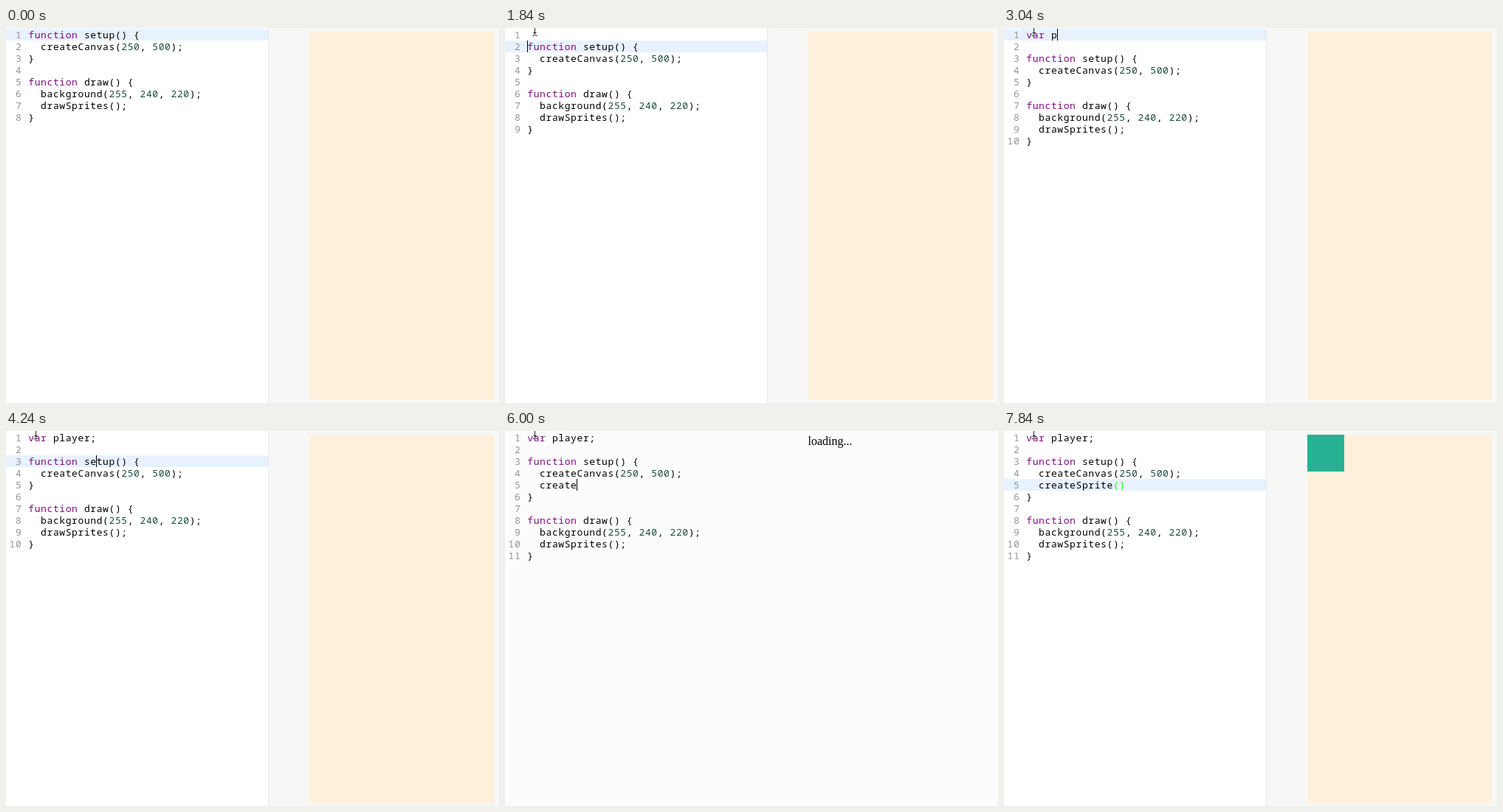
An HTML page with a canvas that plays this animation: 668x509 px, repeating every 8 s.

```html
<!DOCTYPE html>
<html lang="en">
<head>
<meta charset="utf-8">
<title>Code editor with live preview</title>
<style>
  html, body { margin: 0; width: 100%; height: 100%; overflow: hidden; background: #fff; }
  canvas { display: block; }
</style>
</head>
<body>
<canvas id="stage" width="668" height="509"></canvas>
<script>
const ctx = document.getElementById('stage').getContext('2d');
const LOOP = 8000, TICK = 80;
const CHAR = 8.4, ROW = 16, LEFT = 30;
const CODE_FONT = '500 13px "Noto Sans Mono", "DejaVu Sans Mono", monospace';
const RELOAD = [6000, 6080];
const CLICK = 1440, SPRITE = 7600, CARET_OFF = 7840;

const START = [
  'function setup() {',
  '  createCanvas(250, 500);',
  '}',
  '',
  'function draw() {',
  '  background(255, 240, 220);',
  '  drawSprites();',
  '}'
];

const KEYS = [
  [1840, 'Enter'], [1920, 'Enter'], [2240, 'Up'], [2320, 'Up'],
  [2480, 'v'], [2640, 'a'], [2720, 'r'], [2880, ' '], [3040, 'p'], [3200, 'l'],
  [3360, 'a'], [3440, 'y'], [3600, 'e'], [3680, 'r'], [3840, ';'],
  [4080, 'Down'], [4240, 'Down'], [4400, 'Down'],
  [4720, 'End'], [4880, 'Enter'],
  [5120, 'c'], [5280, 'r'], [5360, 'e'], [5520, 'a'], [5600, 't'], [5760, 'e'],
  [6160, 'S'], [6320, 'p'], [6400, 'r'], [6560, 'i'], [6720, 't'], [6800, 'e'],
  [7120, '('], [7280, ')']
];

function press(ed, key) {
  const line = ed.lines[ed.row];
  const before = line.slice(0, ed.col), after = line.slice(ed.col);
  if (key === 'Up' || key === 'Down') {
    ed.row += key === 'Up' ? -1 : 1;
    ed.col = Math.min(ed.goal, ed.lines[ed.row].length);
    return;
  }
  if (key === 'Enter') {
    const indent = before.match(/^ */)[0];
    ed.lines.splice(ed.row++, 1, before, indent + after);
    ed.col = indent.length;
  } else if (key === 'End') {
    ed.col = line.length;
  } else {
    // Brackets close themselves; a typed ")" steps over the added one.
    const stepOver = key === ')' && after[0] === ')';
    if (!stepOver) ed.lines[ed.row] = before + key + (key === '(' ? ')' : '') + after;
    ed.col++;
  }
  ed.goal = ed.col;
}

function editorAt(t) {
  const ed = { lines: START.slice(), row: 0, col: 0, goal: 0 };
  for (const [time, key] of KEYS) if (time <= t) press(ed, key);
  return ed;
}

function rect(color, x, y, w, h) {
  ctx.fillStyle = color;
  ctx.fillRect(x, y, w, h);
}

// Each glyph sits in the middle of its grid cell.
function drawCells(text, x, y, color) {
  ctx.fillStyle = color;
  ctx.textAlign = 'center';
  [...text].forEach((ch, i) => ctx.fillText(ch, x + (i + 0.5) * CHAR, y));
}

function tokenColor(token, matched) {
  if (/^(function|var)$/.test(token)) return '#800c80';
  if (/^\d/.test(token)) return '#1c4c3f';
  return matched && /[()]/.test(token) ? '#00ff00' : '#000';
}

function drawLine(text, row, matched) {
  const y = 14 + row * ROW;
  const number = String(row + 1);
  drawCells(number, 21 - number.length * CHAR, y, '#949494');
  for (const m of text.matchAll(/\w+|[^\w\s]/g)) {
    drawCells(m[0], LEFT + m.index * CHAR, y, tokenColor(m[0], matched));
  }
}

function drawEditor(t, loading) {
  const ed = editorAt(t);
  if (!loading) rect('#e8f2ff', 0, 1 + ed.row * ROW, 355, ROW);
  ctx.font = CODE_FONT;
  ed.lines.forEach((text, i) => drawLine(text, i, t >= 7120 && i === ed.row));
  if (t >= CLICK && t < CARET_OFF) {
    rect('#000', Math.floor(LEFT + ed.col * CHAR), 1 + ed.row * ROW, 1, ROW);
  }
}

function drawPreview(t, loading) {
  if (loading) {
    ctx.font = '16px "Liberation Serif", Times, serif';
    ctx.textAlign = 'left';
    ctx.fillStyle = '#000';
    ctx.fillText('loading...', 410.5, 19);
    return;
  }
  rect('#f7f7f7', 355, 0, 313, 509);
  rect('#e6e6e6', 355, 0, 1, 509);
  rect('rgb(255,240,220)', 411, 5, 250, 500);
  if (t >= SPRITE) rect('#27b294', 411, 5, 50, 50);
}

function pointerAt(t) {
  if (t >= CLICK) return [40, 3];
  const p = Math.min(1, (t - 80) / 1040);
  const e = p * p * (3 - 2 * p);
  return [Math.round(170 - 126 * e), Math.round(387 - 378 * e)];
}

function drawPointer(t) {
  if (t < 80) return;
  const [x, y] = pointerAt(t);
  ctx.save();
  ctx.translate(x + 0.5, y + 0.5);
  ctx.beginPath();
  for (const s of [-1, 1]) {
    ctx.moveTo(-3, 7 * s);
    ctx.lineTo(-1, 7 * s);
    ctx.lineTo(0, 6 * s);
    ctx.lineTo(1, 7 * s);
    ctx.lineTo(3, 7 * s);
  }
  ctx.moveTo(0, -6);
  ctx.lineTo(0, 6);
  ctx.moveTo(-2, 3);
  ctx.lineTo(2, 3);
  ctx.strokeStyle = '#222';
  ctx.lineWidth = 1;
  ctx.stroke();
  ctx.restore();
}

function draw(now) {
  const t = Math.floor((now % LOOP) / TICK) * TICK;
  const loading = t >= RELOAD[0] && t < RELOAD[1];
  rect(loading ? '#fcfcfc' : '#fff', 0, 0, 668, 509);
  drawEditor(t, loading);
  drawPreview(t, loading);
  drawPointer(t);
}

let origin;
function tick() {
  const now = performance.now();
  origin ??= now;
  draw(now - origin);
  requestAnimationFrame(tick);
}
tick();
</script>
</body>
</html>
```
